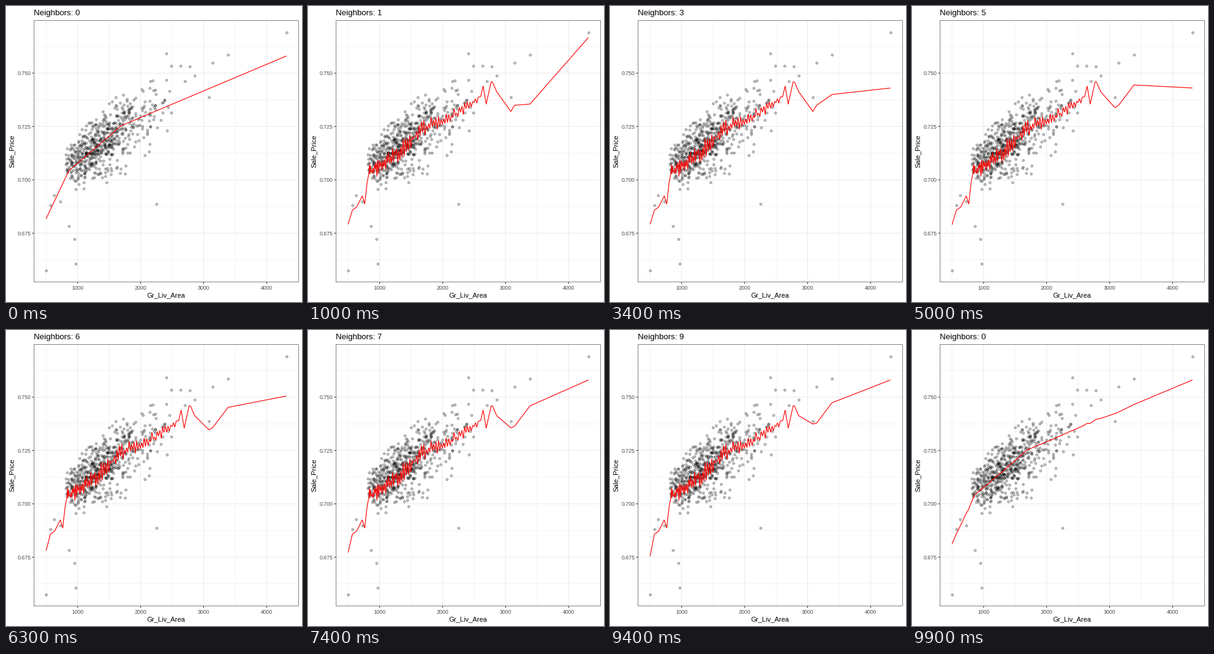
These frames come from a looping animation (480 by 480 pixels, 10000 ms). A matplotlib script:

```python
import numpy as np
import matplotlib.pyplot as plt
from matplotlib.animation import FuncAnimation
from matplotlib.patches import Rectangle

plt.rcParams["font.family"] = "Liberation Sans"
SIZE, DPI = 480, 72
STATES, STEP, HOLD = 10, 10, 5
LEFT, RIGHT, TOP, BOTTOM = 45.4, 474.3, 23.5, 447.6
GRID, DARK, LABEL = "#ebebeb", "#333333", "#4d4d4d"
rng = np.random.default_rng(12)


def area_px(area):
    return 13.9 + 0.1022 * area


def price_px(price):
    return 108.9 + (0.75 - price) * 3460


fig = plt.figure(figsize=(SIZE / DPI, SIZE / DPI), dpi=DPI, facecolor="white")
ax = fig.add_axes([0, 0, 1, 1])
ax.set(xlim=(0, SIZE), ylim=(SIZE, 0))
ax.axis("off")


def segment(x, y, color, width, z):
    ax.plot(x, y, color=color, lw=width, zorder=z, solid_capstyle="butt",
            snap=False)


# Grid, ticks and labels
for a in range(500, 4001, 500):
    x, major = area_px(a), a % 1000 == 0
    segment([x, x], [TOP, BOTTOM], GRID, 1.07 if major else 0.53, 1)
    if major:
        segment([x, x], [BOTTOM, BOTTOM + 3], DARK, 1.07, 2)
        ax.text(x, 460, str(a), size=8.8, color=LABEL, ha="center")
for i in range(9):
    p = 0.6625 + 0.0125 * i
    y, major = price_px(p), i % 2 == 1
    segment([LEFT, RIGHT], [y, y], GRID, 1.07 if major else 0.53, 1)
    if major:
        segment([LEFT - 3, LEFT], [y, y], DARK, 1.07, 2)
        ax.text(40.3, y + 3.2, f"{p:.3f}", size=8.8, color=LABEL, ha="right")
ax.add_patch(Rectangle((LEFT, TOP), RIGHT - LEFT, BOTTOM - TOP, fill=False,
                       ec=DARK, lw=0.6, zorder=6, snap=False))
ax.text((LEFT + RIGHT) / 2, 472.4, "Gr_Liv_Area", size=11, ha="center")
ax.text(13, (TOP + BOTTOM) / 2, "Sale_Price", size=11, rotation=90,
        rotation_mode="anchor", ha="center")
title = ax.text(45, 15, "", size=13.2)

# Rule-based fit: three straight pieces
FIT_X, FIT_Y = [65, 102, 187, 454.8], [345, 267, 194, 81]

# Scatter: a random cloud whose spread grows with area, plus lone houses
area = 1340 * np.exp(rng.normal(0, 0.31, 640))
cx = area_px(area[(area > 810) & (area < 2500)])
spread = np.interp(cx, [97, 120, 150, 200, 250], [11, 20, 24, 28, 25])
cy = np.interp(cx, [97, 130, 187, 270], [258, 241, 198, 158])
cy += spread * np.clip(rng.normal(0, 1, cx.size), -2.2, 2.8)
lone = np.array([(65, 429), (113, 418), (111, 378), (102, 357), (72, 323),
                 (78, 307), (88, 317), (244, 321), (329, 148), (306, 113),
                 (298, 98), (283, 97), (268, 97), (260, 77), (290, 122),
                 (335, 92), (360, 79), (455, 42.5)])
ax.scatter(np.r_[cx, lone[:, 0]], np.r_[cy, lone[:, 1]], s=3.9 ** 2,
           color=(0, 0, 0, 0.25), linewidths=0.94, zorder=3)

# Neighbour-corrected fit: sparse ends around a jagged middle
head = [(65, 354), (72, 331), (79, 326), (88, 308), (92, 321), (96, 285)]
tail = [(280, 147), (284, 130), (289, 159), (297, 123), (299, 123),
        (306, 139), (329, 171), (335, 161), (360, 159), (454.8, 51)]
n = 100
mx = 99 + 177 * np.linspace(0, 1, n) ** 1.25
swing = (-1) ** np.arange(n) * rng.uniform(0, 1, n)
my = np.interp(mx, [99, 125, 150, 188, 235, 276], [270, 254, 234, 199, 178, 150])
my += swing * np.interp(mx, [99, 165, 235, 276], [14, 18, 11, 7])
base = np.vstack([head, np.column_stack([mx, my]), tail])
lx = base[:, 0]

# Only the end points keep moving as neighbours are added
k = np.arange(1, STATES)
fits = np.tile(base[:, 1], (STATES, 1))
fits[0] = np.interp(lx, FIT_X, FIT_Y)
fits[1:, 0] = np.interp(k, [4, 5, 9], [354, 354.6, 367])
fits[1:, -4] = np.interp(k, [3, 9], [171, 152.5])
fits[1:, -3] = np.interp(k, [5, 9], [161, 151])
fits[1:, -2] = np.interp(k, [1, 5, 9], [159, 128, 118])
fits[1:, -1] = np.interp(k, [1, 2, 3, 5, 7], [51, 128, 133, 133, 81])

line, = ax.plot(lx, fits[0], color="red", lw=1.15, zorder=5, snap=False,
                solid_capstyle="butt")


def ease(t):
    return 2 * t * t if t < 0.5 else 1 - 2 * (1 - t) ** 2


def update(i):
    now, step = divmod(i, STEP)
    nxt = (now + 1) % STATES
    t = max(0, step - HOLD) / (STEP - HOLD)
    e = ease(t)
    line.set_ydata((1 - e) * fits[now] + e * fits[nxt])
    title.set_text(f"Neighbors: {now if t < 0.5 else nxt}")
    return line, title


anim = FuncAnimation(fig, update, frames=STATES * STEP, interval=100,
                     repeat=True, repeat_delay=0)
plt.show()
```
